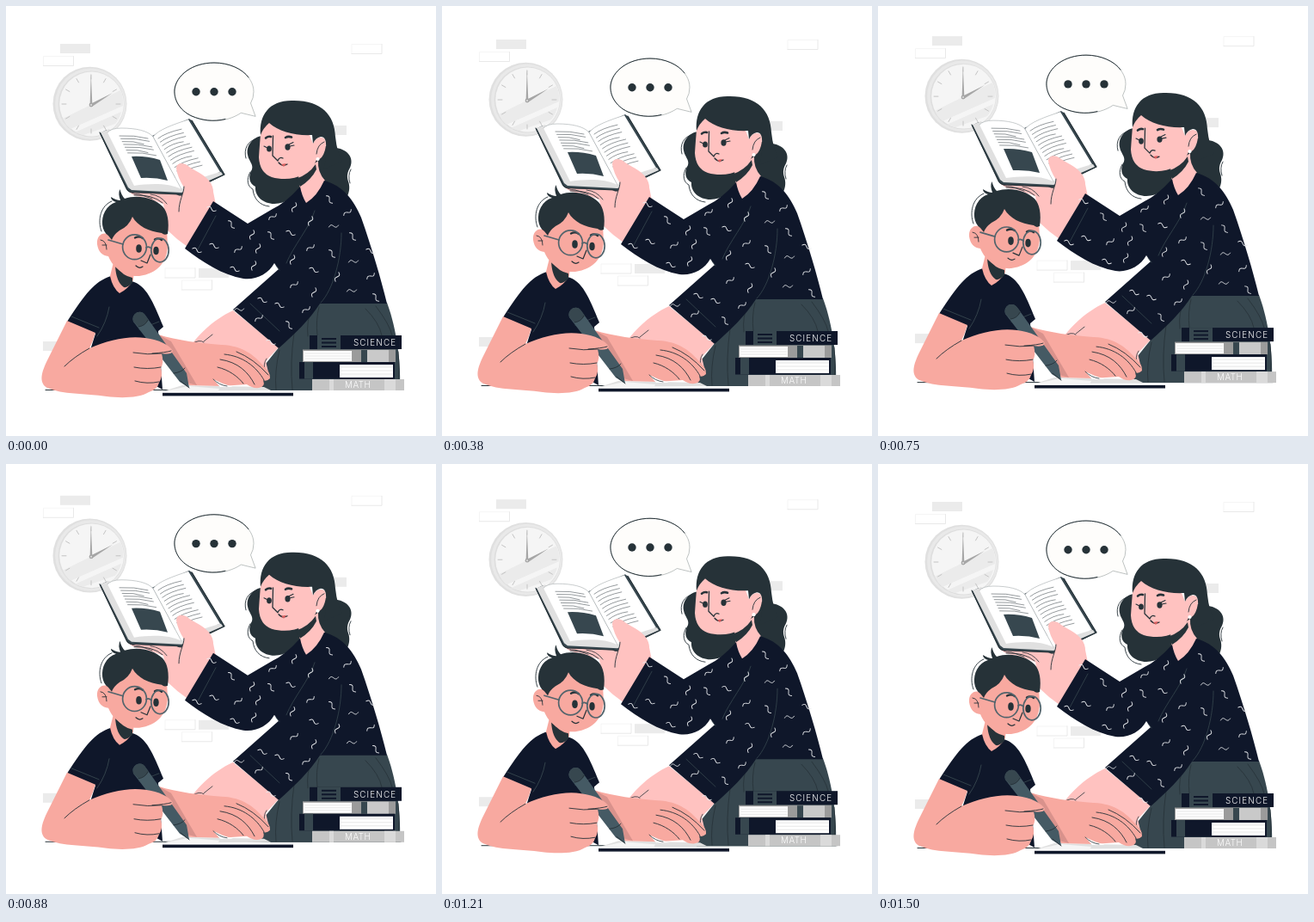
Write an HTML page with a canvas that moves like this. It is 500x500 px and loops after 1540 ms.

```html
<!DOCTYPE html>
<html lang="en">
<head>
<meta charset="utf-8">
<title>Homework help</title>
<style>
html, body { margin: 0; width: 100%; height: 100%; overflow: hidden; background: #fff; }
canvas { display: block; width: 100vw; height: 100vh; }
</style>
</head>
<body>
<canvas id="stage" width="500" height="500"></canvas>
<script>
const ctx = document.getElementById('stage').getContext('2d');
const INK = '#263238', SLATE = '#37474f', STEEL = '#455a64', NAVY = '#0f172a';
const PINK = '#ffc2c0', PEACH = '#f8a9a0', PALE = '#ebebeb';

const fill = (color, d) => { ctx.fillStyle = color; ctx.fill(new Path2D(d)); };
const line = (color, width, d) => {
  ctx.strokeStyle = color;
  ctx.lineWidth = width;
  ctx.stroke(new Path2D(d));
};
const box = (color, x, y, w, h) => { ctx.fillStyle = color; ctx.fillRect(x, y, w, h); };
const oval = (color, x, y, rx, ry = rx) => {
  ctx.fillStyle = color;
  ctx.beginPath();
  ctx.ellipse(x, y, rx, ry, 0, 0, 7);
  ctx.fill();
};
const ring = (color, width, x, y, rx, ry = rx) => {
  ctx.strokeStyle = color;
  ctx.lineWidth = width;
  ctx.beginPath();
  ctx.ellipse(x, y, rx, ry, 0, 0, 7);
  ctx.stroke();
};
const label = (text, x, y, size, spacing) => {
  ctx.font = `300 ${size}px Inter, sans-serif`;
  ctx.letterSpacing = spacing + 'px';
  ctx.fillStyle = '#fff';
  ctx.fillText(text, x, y);
};

function wall() {
  for (const [x, y, w] of [[63, 44, 35], [361, 139, 35], [224, 305, 35], [43, 390, 35]]) box(PALE, x, y, w, 11);
  for (const [x, y] of [[43.5, 58.5], [402, 44.5], [185, 305], [204.5, 319]]) {
    line('#f1f1f1', 0.7, `M${x} ${y + 11}v-11h35`);
    line('#e4e4e4', 0.8, `M${x} ${y + 11}h35v-11`);
  }
}

function clock() {
  oval('#e0e0e0', 97.5, 113.7, 43);
  oval('#e9e9e9', 98.4, 113.7, 41.2);
  oval('#dedede', 99, 114, 38.4);
  oval('#f5f5f5', 99.6, 114, 37.4);
  fill('#ebebeb', 'M66 131L133 98Q137 107 136 116L75 143Q69 138 66 131ZM80 147L134 123Q132 131 127 137L90 150Z');
  for (let i = 0; i < 12; i++) {
    const a = i * Math.PI / 6, c = Math.cos(a), s = Math.sin(a);
    line('#c4c4c4', 1, `M${99 + 29 * c} ${114 + 29 * s}L${99 + 34 * c} ${114 + 34 * s}`);
  }
  fill('#a6a6a6', 'M97.6 116L98.8 78L100.4 116ZM98 114L124 101L100 117Z');
  oval('#a6a6a6', 99, 115, 2.4);
  oval('#e0e0e0', 99, 115, 1);
}

function bubble() {
  const shape = 'M273 124.5C264 130.5 253 133.5 241.5 133.5C216 133.5 196 119 196 99.7C196 81 216 66 242 66C267 66 288 81 288 99.7Q288 107 284.5 113L290 128Z';
  fill('#fefdfb', shape);
  line('#7d8786', 0.5, shape);
  line(INK, 1, 'M255 131.5C241 135 228 133 216 128C201 121 195 108 196 97C198 81 216 66 242 66C259 66 275 73 282 83');
  for (const x of [221, 242, 263]) oval(INK, x, 99.8, 4.7);
}

function skirt() {
  fill(SLATE, 'M338 340L443 345C451 366 460 405 458 447H296L302 416L318 396Z');
  line(INK, 0.8, 'M356 352Q349 365 351 384M364 350Q360 365 362 383M335 380Q330 415 333 446M318 400Q312 425 314 446M418 352Q434 368 437 383M430 349Q446 370 449 383M456 402Q458 425 456 436');
}

function hairBack() {
  fill(INK, 'M297 151C287 153 279 162 281 173C282 180 288 184 286 190C281 198 283 207 290 210C289 221 299 230 312 230C326 230 335 221 343 212L368 230L384 231C396 229 402 215 398 204C396 198 397 193 400 188C405 177 398 167 384 165Z');
  line(INK, 0.9, 'M292 154C281 157 276 166 279 177M284 193C279 202 281 210 287 213C288 224 295 232 306 233M401 190Q397 197 400 206');
}

function raisedHand() {
  fill(PINK, 'M138 204C138 214 146 222 160 222L183 230L188 261Q198 271 211 280L244 231L240 211L200 202Z');
  line(INK, 0.8, 'M140 212Q145 219 155 219L170 224M168 219Q180 220 187 230');
}

function openBook() {
  fill(SLATE, 'M109 148L117 144L170 151L213 131L217 134L254.5 196L207 219Q203 222 198 219L145 217Q141 216 139 211Z');
  fill('#e0e0e0', 'M110 147L120 143L150 198L200 200L250 193L252 196L204 217L146 214L142 211Z');
  fill('#fff', 'M118 147Q122 142 134 142C151 142 165 145 171 152L204 213C190 206 169 206 149 209Z');
  fill('#fff', 'M171 152C177 144 194 138 212 132L249 193C231 198 213 204 204 213Z');
  line('#b0b6b8', 0.7, 'M171 152L204 213M118 147Q122 142 134 142C151 142 165 145 171 152C177 144 194 138 212 132');
  line(INK, 1.1, 'M109 147L140 212Q142 216 146 216.5L200 219Q204 221 208 218L254 196L216 133');
  fill(SLATE, 'M146 175Q162 174 179 179L188 203Q173 199 157 200Z');
  for (let i = 0; i < 7; i++) {
    const x = 132 + i * 1.6, y = 151 + i * 3.3;
    line('#4d575c', 0.6, `M${x} ${y}q${i % 3 === 2 ? 13 : 17} -1 ${i % 3 === 2 ? 25 : 33} 3`);
  }
  for (let i = 0; i < 11; i++) {
    const x = 177 + i * 2.4, y = 154 + i * 4.2, w = i % 4 === 3 ? 22 : 27;
    line('#4d575c', 0.6, `M${x} ${y}q9 -7 ${w} ${-w * 0.4}`);
  }
}

function thumb() {
  fill(PINK, 'M201 239C201 229 206 218 207 211C202 203 199 196 198 189C198 182 207 181 213 187C222 193 236 198 240 210L241 216L239 235L215 256Z');
  line(INK, 0.9, 'M207 210C207 218 201 226 201 239');
}

function shirt() {
  fill(NAVY, 'M241 227L281 253L310 236Q325 229 342 210Q344 221 349 229Q362 221 370 203C392 209 404 225 413 246C425 280 436 317 443 346L365 346C353 365 335 382 317 398L264 353L317 306L312 299C305 312 290 319 276 317C252 313 229 298 208 282Z');
  line(SLATE, 0.8, 'M359 238C353 258 334 279 326 299M390 264C390 293 381 329 366 345M244 244L223 283M284 346L318 378M314 302L318 307');
  const marks = [
    239, 236, 1, 262, 254, 2, 310, 245, 5, 335, 234, 4, 286, 266, 4, 308, 267, 2, 331, 264, 1, 354, 250, 4,
    381, 256, 0, 403, 268, 2, 376, 225, 2, 397, 240, 5, 242, 279, 1, 270, 283, 5, 293, 282, 4, 288, 302, 4,
    266, 306, 1, 333, 295, 4, 354, 281, 5, 379, 288, 2, 358, 307, 1, 404, 297, 0, 424, 285, 1, 424, 314, 5,
    385, 315, 4, 402, 331, 0, 335, 324, 5, 318, 348, 1, 349, 353, 5, 329, 371, 2, 298, 342, 1, 358, 333, 4,
    294, 363, 5, 308, 391, 1, 430, 339, 2, 271, 353, 0, 222, 284, 1
  ];
  for (let i = 0; i < marks.length; i += 3) {
    ctx.save();
    ctx.translate(marks[i], marks[i + 1]);
    ctx.rotate(marks[i + 2] * Math.PI / 6);
    line('#e8eaed', 0.9, 'M-5.5 1C-3.5 -2.5 -2 -1.5 0 0S3.5 2 5.5 -1');
    ctx.restore();
  }
}

function womanHead() {
  fill(PINK, 'M340 196L363 180Q362 193 371 203L364 222L349 231Q343 222 341 208Z');
  fill(INK, 'M337 201Q352 196 360 184L361 190Q355 202 342 210Z');
  fill(PINK, 'M297 138Q295 160 294 176Q295 194 309 199C330 205 353 198 361 179C370 180 375 158 370 154Q362 150 357 160L348 137L305 127Z');
  fill(INK, 'M296 150C294 127 306 110 332 110C366 109 382 126 383 152Q385 171 391 181L369 190Q373 179 372 165Q373 152 366 152Q360 153 357 160L356 150C336 151 317 146 306 136Q299 142 296 150Z');
  line(INK, 0.9, 'M370 158Q362 161 361 172');
  line(INK, 1.3, 'M310.5 151L310 174L316 180Q318 175 322 177M317 182Q321 187 327 184');
  line(INK, 2.6, 'M302 153.5Q305 151 308 152M325 153Q328 151 332 152.5');
  oval(INK, 306, 166, 2.9, 3.6);
  oval(INK, 327.5, 164, 3.1, 3.7);
  line(INK, 1.1, 'M304 165L300 163M329 161L334 158.5M330 163L335 162');
  fill('#d95f5f', 'M320 184L326 183L323 187Z');
  oval('#fff', 362.5, 178, 2.1);
}

function loweredHand() {
  fill(PINK, 'M264 354L317 397L302 413L306 430L250 438L211 402C219 386 240 365 264 354Z');
  line(INK, 0.8, 'M216 393Q225 387 230 391M230 390L240 382M303 410Q298 418 302 424');
}

function boyTorso() {
  fill(NAVY, 'M122 314C103 320 92 335 71 367L104 381L98 400L182 446L177 378L183 373C171 344 163 324 146 320Z');
  line(SLATE, 0.9, 'M120 350Q117 368 106 384M76 361L108 374M155 376L178 367');
}

function boyHead() {
  fill(PEACH, 'M126 294L121 314Q124 328 132 334Q142 329 148 319L149 305Z');
  fill(INK, 'M127 302Q136 314 147 316L147 322Q141 328 137 327Q128 321 127 302Z');
  fill(PEACH, 'M119 266C113 262 105 267 106 277Q108 290 119 291C125 306 140 315 155 314C176 311 187 298 188 280L187 260L160 239L130 244Z');
  fill(INK, 'M119 267C111 262 110 248 115 239Q119 231 128 228Q122 226 122 222Q128 226 133 226Q130 218 132.5 213Q134 220 138 224C153 219 172 223 182 233Q191 243 188 265Q184 267 181 264C166 262 153 256 147 245Q143 256 132 261Q125 266 123 272Z');
  line(INK, 0.9, 'M111 262C106 249 110 232 123 227M149 220Q171 219 182 229');
  line(INK, 0.9, 'M110 272Q117 273 117 283M112 278L117 278');
  line(INK, 2.4, 'M150 269.5Q155 267 159 270M173 271.5Q177 269 181 272');
  oval(INK, 154.5, 282, 3.3, 4.8);
  oval(INK, 174.5, 284.5, 3.2, 4.8);
  line(INK, 1.2, 'M168 289L164 299L157 296M151 302Q155 306 159 303');
  line('#53646c', 1.7, 'M119 272L136 277M163 281Q166 279 169 282');
  ring('#53646c', 1.7, 149.5, 280.3, 13.9, 14.4);
  ring('#53646c', 1.7, 179, 284, 10.2, 13.8);
}

function notebook() {
  fill('#e0e0e0', 'M183 448L205 441L300 443L308 447Z');
  fill('#f5f5f5', 'M184 448L212 442L248 445L246 449Z');
  box(NAVY, 182, 449.8, 152, 3.6);
}

function farArm() {
  fill(PEACH, 'M177 382C199 389 226 392 251 394C276 395 289 407 298 417Q308 426 307 433Q303 437 299 435Q302 443 294 444Q287 445 280 440L250 442L213 441L184 405Z');
  fill('#d9928c', 'M179 383L192 390L222 441L207 437Z');
  line(INK, 0.9, 'M254 405C275 407 291 419 300 435M249 411C270 414 282 426 289 440M246 420C259 423 270 431 276 439M268 402Q288 410 305 429');
  fill('#fff', 'M241 434L252 439L264 443L249 443Z');
  line(INK, 0.8, 'M241 434Q248 441 257 442');
}

function pencil() {
  fill(STEEL, 'M148 367Q146 360 152 356.5Q159 354 163 361L210 427L213 444L202 437Z');
  fill(SLATE, 'M148 367Q146 360 152 356.5Q159 354 163 361L166 365Q162 372 154 373Z');
  line(INK, 0.9, 'M154 373Q162 372 165 365M195 427Q204 426 208 421M203 436L213 444');
}

function nearArm() {
  fill(PEACH, 'M71 366L104 380Q101 390 97 398C119 388 143 383 162 386C178 388 190 394 194 401Q193 406 181 404Q184 415 180 421Q183 430 178 438Q176 446 166 449C155 456 133 456 117 454C91 450 66 452 48 444C39 439 40 429 47 414Z');
  line(INK, 0.9, 'M97 398Q79 408 68 419M148 403Q165 406 181 404M149 420Q164 423 180 420M150 436Q164 440 178 437M170 404Q186 403 192 401');
}

function bookStack() {
  box(NAVY, 353, 383, 107, 16);
  box(SLATE, 362, 383, 27, 16);
  for (const y of [386, 390.5, 395]) box(NAVY, 367, y, 17, 2);
  label('SCIENCE', 404, 395, 9.8, 1.15);

  box('#9b9b9b', 345, 399.5, 108, 14.5);
  box('#fff', 346, 401, 56, 12);
  line('#d5d5d5', 0.6, 'M348 404H401M348 407H401M348 410H401');
  box(SLATE, 413, 400, 7, 14);
  box('#c9c9c9', 420, 400, 25, 14);

  box(NAVY, 341, 414, 111, 19.5);
  box(SLATE, 347, 414, 10, 19.5);
  box('#fff', 388, 417, 62, 15);
  line('#d5d5d5', 0.6, 'M390 420H449M390 424H449M390 428H449');

  box('#c5c5c5', 356, 434, 107, 13);
  box('#dadada', 376, 434, 5, 13);
  box('#dadada', 440, 434, 13, 13);
  label('MATH', 394, 444, 9.8, 0.6);
}

function drawScene() {
  wall();
  clock();
  bubble();
  line(INK, 1, 'M46 446.5H459');
  skirt();
  hairBack();
  raisedHand();
  openBook();
  thumb();
  loweredHand();
  womanHead();
  shirt();
  boyTorso();
  boyHead();
  notebook();
  farArm();
  pencil();
  nearArm();
  bookStack();
}

// Linear float of 10 px with a 1.5 s period, stepped at 24 fps.
function floatOffset(ms) {
  const step = Math.min(36, Math.floor((ms % 1540 + 4) * 24 / 1000));
  const phase = (step + 1) % 36;
  return (1 - Math.min(phase, 36 - phase)) * 10 / 18;
}

ctx.lineCap = ctx.lineJoin = 'round';
const start = performance.now();
function render() {
  ctx.setTransform(1, 0, 0, 1, 0, 0);
  box('#fff', 0, 0, 500, 500);
  ctx.translate(0, floatOffset(performance.now() - start));
  drawScene();
  requestAnimationFrame(render);
}
render();
</script>
</body>
</html>
```
